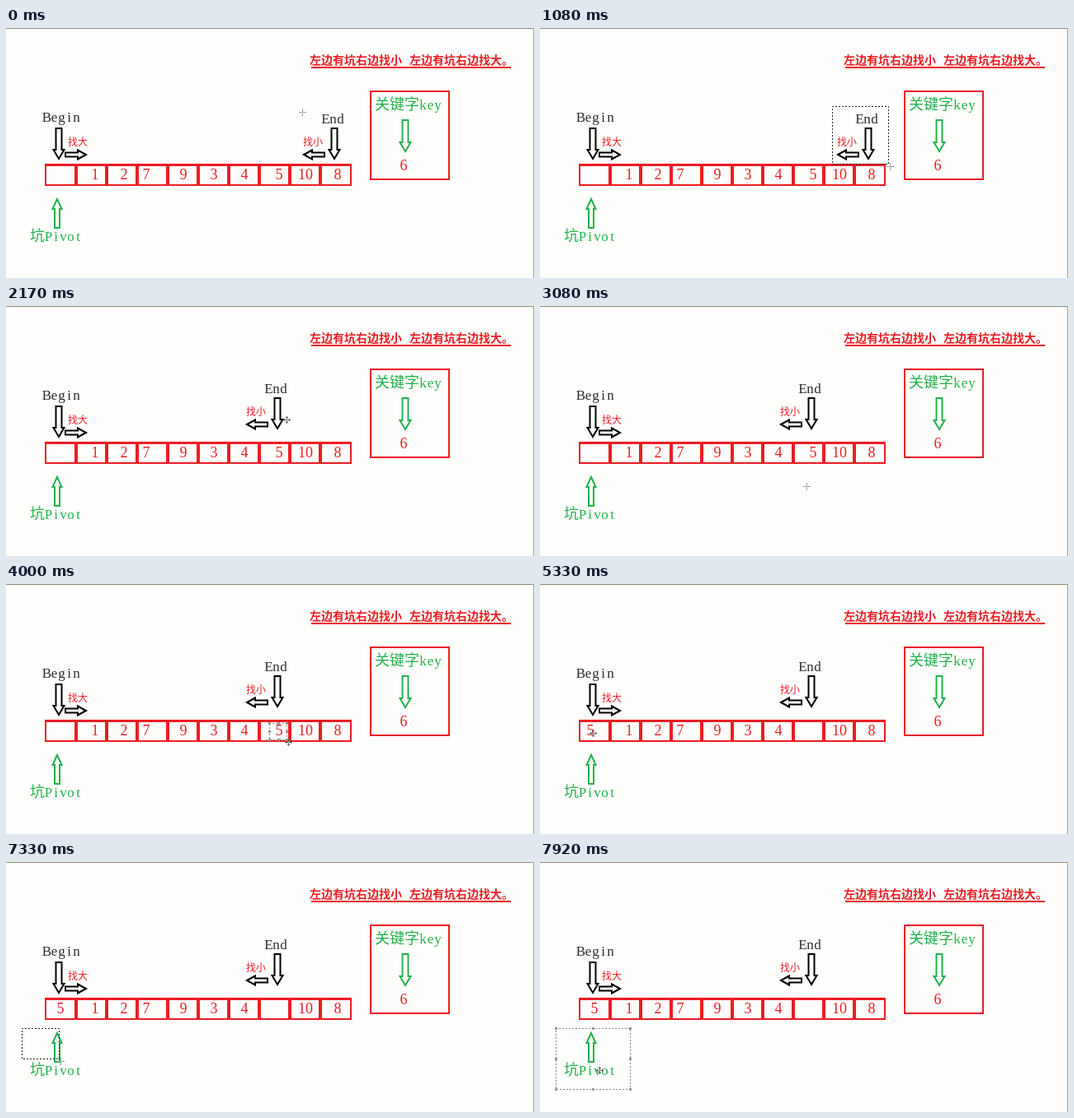
Recreate the animation shown at these times as an HTML page with a canvas. Size 640 by 304 pixels, loop 8000 ms.

```html
<!DOCTYPE html>
<html lang="zh">
<head>
<meta charset="utf-8">
<title>Quicksort: filling the pit</title>
<style>
html, body { margin: 0; width: 100%; height: 100%; overflow: hidden; background: #fefefc; }
canvas { display: block; }
</style>
</head>
<body>
<canvas id="stage" width="640" height="304"></canvas>
<script>
const ctx = document.getElementById('stage').getContext('2d');
const FPS = 12, FRAMES = 96;
const PAPER = '#fefefc', RED = '#ed1c24', INK = '#000', DARK = '#2b2b2b', GREEN = '#22b14c';
const CJK = '"Noto Sans CJK SC", "Noto Sans CJK", sans-serif';
const SERIF = '"Liberation Serif", serif';
const DOWN = Math.PI / 2, UP = -DOWN, LEFT = Math.PI, RIGHT = 0;

const CELL = 37, ROW_X = 48;
const VALUES = ['', 1, 2, 7, 9, 3, 4, 5, 10, 8];
const NUDGE = { 1: 4, 2: 2, 7: -8, 5: 5, 8: 2 };  // digits typed off-centre

// Each selection is framed, gets handles when ready, is dragged from grab to drop, then cleared.
const END = { x: 354, y: 95, w: 68, h: 70, start: 3, ready: 15, grab: 19, drop: 29, clear: 31 };
const FIVE = { x: 319, y: 169, w: 21, h: 20, start: 39, ready: 48, grab: 50, drop: 67, clear: 71 };
const PIT = { x: 19, y: 202, w: 90, h: 74, start: 84, ready: 91, grab: 96, drop: 96, clear: 96 };
const SELECTIONS = [END, FIVE, PIT];

const first = s => [s.x + 1, s.y + 2];
const last = s => [s.x + s.w + 2, s.y + s.h + 3];

// Pointer moves in frames; lift bends the way upwards.
const MOVES = [
  { from: 0, to: 1, at: first(END) },
  { from: 3, to: 12, at: last(END) },
  { from: 17, to: 19, at: [409, 148] },
  { from: 19, to: 25, at: [340, 138] },
  { from: 30, to: 38, at: first(FIVE), lift: -75 },
  { from: 39, to: 45, at: last(FIVE) },
  { from: 48, to: 50, at: [334, 181] },
  { from: 50, to: 63, at: [64, 181], lift: 85 },
  { from: 66, to: 67, at: [69, 181] },
  { from: 71, to: 75, at: [140, 134] },
  { from: 78, to: 84, at: first(PIT) },
  { from: 84, to: 90, at: last(PIT) },
  { from: 91, to: 95, at: [72, 253] }
];

const ease = t => t * t * (3 - 2 * t);
const during = (f, from, to) => f >= from && f < to;

function pointer(f) {
  let [x, y] = [359, 102];
  for (const { from, to, at, lift = 0 } of MOVES) {
    if (f <= from) break;
    const t = Math.min(1, (f - from) / (to - from)), k = ease(t);
    x += (at[0] - x) * k;
    y += (at[1] - y) * k - lift * Math.sin(Math.PI * t);
  }
  return [Math.round(x), Math.round(y)];
}

function dragged(f, { grab, drop }) {
  const [x, y] = pointer(Math.min(Math.max(f, grab), drop)), [x0, y0] = pointer(grab);
  return [x - x0, y - y0];
}

function text(str, x, y, font, color, align = 'left') {
  ctx.font = font;
  ctx.fillStyle = color;
  ctx.textAlign = align;
  ctx.fillText(str, x, y);
}

// Half-width letters, each centred in its own 9 px cell
const latin = (str, x, y, color) =>
  [...str].forEach((c, i) => text(c, x + 9 * i + 4.5, y, '17px ' + SERIF, color, 'center'));

const digit = (n, x, y = 184) => text(n, x, y, '18px ' + SERIF, RED, 'center');
const hint = (str, x, y) => text(str, x, y, '12px ' + CJK, RED);

function fill(color, x, y, w, h) {
  ctx.fillStyle = color;
  ctx.fillRect(x, y, w, h);
}

// Outlined block arrow with its tip at (x, y), pointing along angle
function arrow(x, y, angle, color, length, head = 11, half = 6.5, shaft = 3.5) {
  ctx.save();
  ctx.translate(x, y);
  ctx.rotate(angle);
  ctx.beginPath();
  [[0, 0], [-head, half], [-head, shaft], [-length, shaft],
   [-length, -shaft], [-head, -shaft], [-head, -half]].forEach(p => ctx.lineTo(...p));
  ctx.closePath();
  ctx.strokeStyle = color;
  ctx.lineWidth = 2;
  ctx.stroke();
  ctx.restore();
}

const smallArrow = (x, y, angle) => arrow(x, y, angle, INK, 25, 10, 5.5, 2.5);

function drawRow(f) {
  const width = CELL * VALUES.length;
  fill(RED, ROW_X - 1, 165, width + 2, 3);
  fill(RED, ROW_X - 1, 190, width + 2, 2);
  for (let i = 0; i <= VALUES.length; i++) {
    const w = i % VALUES.length ? 4 : 2;
    fill(RED, ROW_X + CELL * i - w / 2, 165, w, 27);
  }
  VALUES.forEach((n, i) => {
    const [dx, dy] = n === 5 ? dragged(f, FIVE) : [0, 0];
    digit(n, ROW_X + 19 + CELL * i + (NUDGE[n] || 0) + dx, 184 + dy);
  });
}

function drawBoard() {
  fill(PAPER, 0, 0, 640, 304);
  fill('#8b8b72', 0, 0, 640, 1);
  fill('#a5a58c', 639, 0, 1, 304);

  text('左边有坑右边找小', 368, 44, 'bold 14px ' + CJK, RED);
  text('左边有坑右边找大。', 489, 44, 'bold 14px ' + CJK, RED);
  fill(RED, 370, 47, 242, 2);

  ctx.strokeStyle = RED;
  ctx.lineWidth = 2;
  ctx.strokeRect(442, 77, 95, 107);
  text('关键字', 447, 99, '18px ' + CJK, GREEN);
  latin('key', 501, 99, GREEN);
  arrow(484, 150, DOWN, GREEN, 38);
  digit(6, 482, 173);

  latin('Begin', 45, 114, DARK);
  arrow(64, 159, DOWN, INK, 37);
  smallArrow(97, 154, RIGHT);
  hint('找大', 75, 143);

  arrow(62, 208, UP, GREEN, 35, 12, 5.5, 3);
  text('坑', 29, 259, '18px ' + CJK, GREEN);
  latin('Pivot', 47, 259, GREEN);
}

function drawEnd(dx, dy) {
  latin('End', 383 + dx, 116 + dy, DARK);
  arrow(398 + dx, 159 + dy, DOWN, INK, 37);
  smallArrow(361 + dx, 154 + dy, LEFT);
  hint('找小', 360 + dx, 143 + dy);
}

function dottedBox(x, y, w, h, color) {
  ctx.strokeStyle = color;
  ctx.lineWidth = 1;
  ctx.setLineDash([2, 2]);
  ctx.lineDashOffset = .5;
  ctx.strokeRect(x + .5, y + .5, w, h);
  ctx.setLineDash([]);
}

function drawSelection(s, f) {
  if (during(f, s.start, s.ready)) {
    const [px, py] = pointer(f);
    dottedBox(s.x, s.y, Math.max(0, px - 2 - s.x), Math.max(0, py - 3 - s.y), '#222');
  } else if (during(f, s.ready, s.grab) || during(f, s.drop, s.clear)) {
    const [dx, dy] = dragged(f, s), x = s.x + dx, y = s.y + dy;
    dottedBox(x, y, s.w, s.h, '#888');
    for (const i of [0, .5, 1]) for (const j of [0, .5, 1]) {
      if (i !== .5 || j !== .5) fill('#999', Math.round(x + s.w * i) - 1, Math.round(y + s.h * j) - 1, 3, 3);
    }
  }
}

function drawPointer(f) {
  const [x, y] = pointer(f);
  const moving = SELECTIONS.some(s => during(f, s.ready, s.clear));
  const color = moving ? '#666' : '#999';
  fill(color, x - 4, y, 9, 1);
  fill(color, x, y - 4, 1, 9);
  fill(PAPER, x, y, 1, 1);
  if (!moving) return;
  for (const s of [-3, 3]) {
    fill(color, x - 1, y + s, 3, 1);
    fill(color, x + s, y - 1, 1, 3);
  }
}

function loop() {
  const f = Math.floor(performance.now() / 1000 * FPS + 1e-6) % FRAMES;
  drawBoard();
  drawRow(f);
  drawEnd(...dragged(f, END));
  SELECTIONS.forEach(s => drawSelection(s, f));
  drawPointer(f);
  requestAnimationFrame(loop);
}
loop();
</script>
</body>
</html>
```
